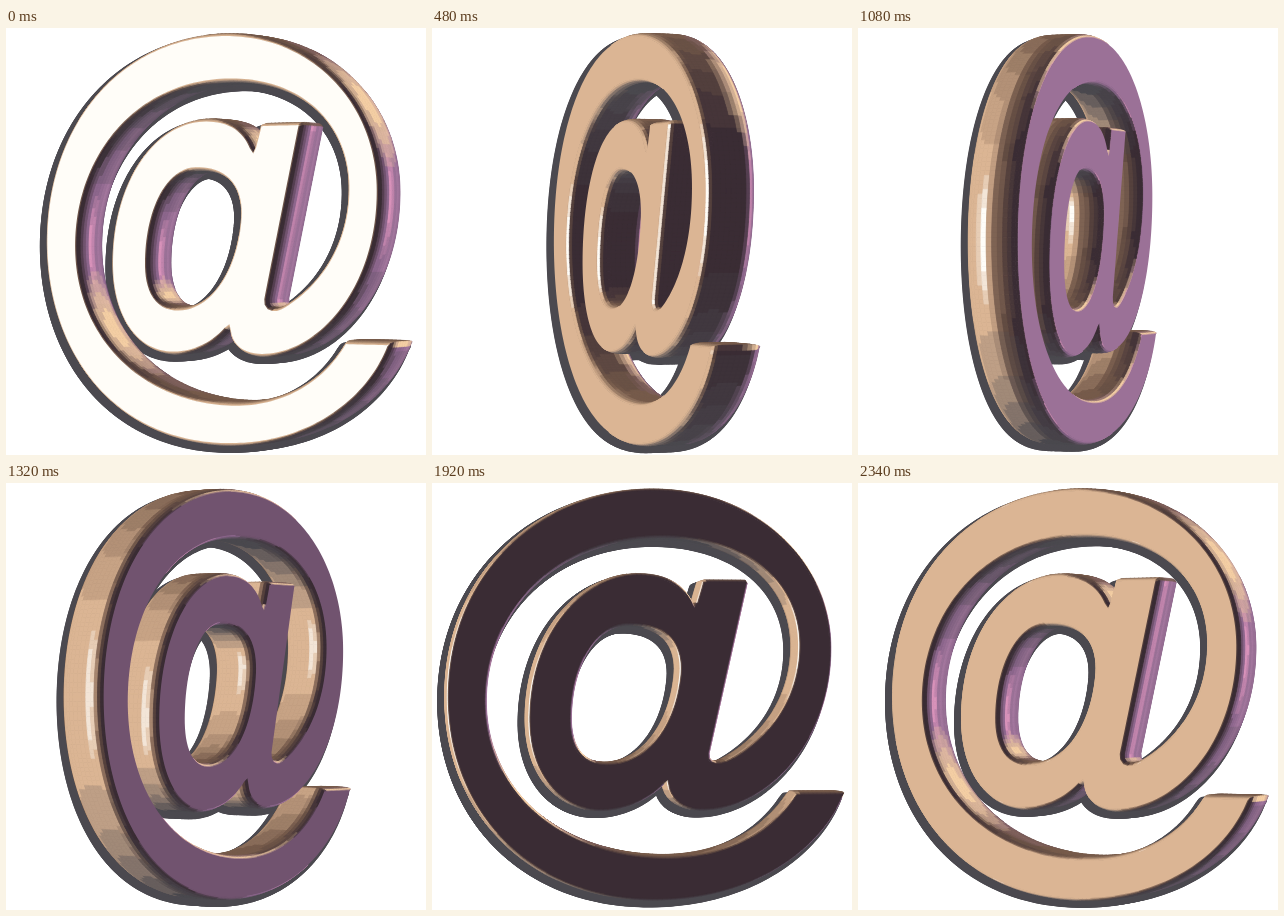
An HTML page with a canvas for the animation above (2400 ms loop, 420 px wide and 427 px high).

```html
<!DOCTYPE html>
<html lang="en">
<head>
<meta charset="utf-8">
<title>Turning at sign</title>
<style>
html, body { margin: 0; width: 100%; height: 100%; overflow: hidden; background: #fff; }
canvas { display: block; }
</style>
</head>
<body>
<canvas id="stage" width="420" height="427"></canvas>
<script>
const ctx = document.getElementById('stage').getContext('2d');
const STEP = 60, STEPS = 40, TURN = 180 / STEPS, START = 30;
const DEPTH = 25, LAYERS = 14, EYE = 2500, SPACING = 4.5;
const RAD = Math.PI / 180;

const BODY = `M414 311C392 368 322 417 224 417C92 417 14 325 14 214C14 92 104 6 222 6
  C325 6 401 76 401 165C401 262 334 327 270 327C248 327 234 316 234 298
  C216 318 190 327 168 327C124 327 95 290 95 236C95 152 146 91 206 91
  C236 91 254 103 262 124L270 97L316 97L277 270C275 280 285 283 296 277
  C338 254 367 214 367 162C367 96 310 53 230 53C124 53 53 128 53 218
  C53 312 134 375 236 375C290 375 338 352 364 311Z`;
const BOWL = `M196 141C232 141 251 160 246 196C240 246 210 281 174 281
  C150 281 138 264 138 236C138 184 162 141 196 141Z`;

// Evenly spaced outline points with outward normals.
function outline(d, reverse) {
  const path = document.createElementNS('http://www.w3.org/2000/svg', 'path');
  path.setAttribute('d', d);
  const len = path.getTotalLength(), n = Math.round(len / SPACING);
  const pts = Array.from({ length: n }, (_, i) => {
    const p = path.getPointAtLength(len * i / n);
    return { x: (p.x - 215) * 0.99, y: (p.y - 213) * 0.99 };
  });
  if (reverse) pts.reverse();
  pts.forEach((p, i) => {
    const a = pts[(i + n - 1) % n], b = pts[(i + 1) % n];
    const dx = b.x - a.x, dy = b.y - a.y, l = Math.hypot(dx, dy) || 1;
    p.nx = dy / l;
    p.ny = -dx / l;
  });
  return pts;
}
const rings = [outline(BODY), outline(BOWL, true)];

const DARK = [58, 44, 52], TAN = [219, 181, 148], WHITE = [255, 253, 248];
const UP = [118, 91, 75], DOWN = [75, 73, 79], PURPLE = [163, 118, 157];
const PINK = [216, 146, 186], WARM = [244, 206, 164];
// Reflected surroundings by heading; positive is to the left.
const SKY = [
  [-180, DARK], [-120, [90, 68, 92]], [-95, [133, 96, 134]], [-72, PURPLE],
  [-55, [140, 102, 140]], [-36, DARK], [0, DARK],
  [12, [98, 76, 66]], [20, [140, 110, 92]], [25, TAN], [92, TAN],
  [115, UP], [150, DARK], [180, DARK]
];
const mix = (a, b, t) => a.map((v, i) => v + (b[i] - v) * t);
const clamp = v => Math.max(0, Math.min(1, v));
const band = (v, n) => Math.round(v * n) / n;

function shade(x, y, z) {
  const yaw = Math.atan2(-x, z) / RAD;
  let i = 1;
  while (i < SKY.length - 1 && SKY[i][0] < yaw) i++;
  const [a, ca] = SKY[i - 1], [b, cb] = SKY[i];
  let c = mix(ca, cb, band((yaw - a) / (b - a), 3));
  const shine = (at, width, tall) =>
    band(clamp(1.6 - Math.abs(yaw - at) / width) * clamp(1 - y * y * tall), 3);
  c = mix(c, WHITE, shine(29.8, 2.5, 12));
  c = mix(c, PINK, shine(-59, 4, 8));
  c = mix(c, y < 0 ? UP : DOWN, band(Math.abs(y) ** 2.5, 5));
  // Warm light from the upper right
  const glow = clamp((0.72 * x - 0.58 * y + 0.38 * z - 0.88) / 0.12);
  return `rgb(${mix(c, WARM, band(glow, 4)).map(Math.round)})`;
}

function draw(deg) {
  const s = Math.sin(deg * RAD), c = Math.cos(deg * RAD);
  const axis = 214.5 + 5 * Math.sin(2 * deg * RAD);
  const level = k => Math.sin((k / LAYERS * 2 - 1) * Math.PI / 2);

  const project = (p, t) => {
    const out = 1 - 3.2 * t ** 6, z0 = DEPTH * t;
    const x = p.x + p.nx * out, y = p.y + p.ny * out;
    const z = x * s + z0 * c, k = EYE / (EYE - z);
    return { x: axis + (x * c - z0 * s) * k, y: 213 + y * k, z };
  };
  const layers = Array.from({ length: LAYERS + 1 }, (_, k) =>
    rings.map(ring => ring.map(p => project(p, level(k)))));

  const trace = pts => {
    pts.forEach((p, i) => i ? ctx.lineTo(p.x, p.y) : ctx.moveTo(p.x, p.y));
    ctx.closePath();
  };
  const slice = layer => {
    ctx.beginPath();
    layer.forEach(trace);
    ctx.fill('evenodd');
  };

  ctx.fillStyle = '#fff';
  ctx.fillRect(0, 0, 420, 427);

  // Grey edge behind the solid
  ctx.save();
  ctx.translate(-4.5, 4.5);
  ctx.fillStyle = ctx.strokeStyle = '#4b494f';
  ctx.lineWidth = 6;
  ctx.lineJoin = 'round';
  layers.forEach(layer => { slice(layer); ctx.stroke(); });
  ctx.restore();

  // Rounded walls, far to near
  const walls = [];
  for (let k = 0; k < LAYERS; k++) {
    const t = level(k + 0.5);
    const bend = (22 * t + 55 * t ** 9) * RAD;
    const side = Math.cos(bend), front = Math.sin(bend);
    rings.forEach((ring, r) => ring.forEach((p, i) => {
      const j = (i + 1) % ring.length, lo = layers[k][r], hi = layers[k + 1][r];
      const q = [lo[i], lo[j], hi[j], hi[i]];
      const area = (q[2].x - q[0].x) * (q[3].y - q[1].y) - (q[2].y - q[0].y) * (q[3].x - q[1].x);
      if (area <= 0) return;
      const nx = p.nx * side;
      walls.push({
        q, z: q[0].z + q[1].z + q[2].z + q[3].z,
        color: shade(nx * c - front * s, p.ny * side, nx * s + front * c)
      });
    }));
  }
  walls.sort((a, b) => a.z - b.z);
  ctx.lineWidth = 0.8;
  for (const w of walls) {
    ctx.fillStyle = ctx.strokeStyle = w.color;
    ctx.beginPath();
    trace(w.q);
    ctx.fill();
    ctx.stroke();
  }

  ctx.fillStyle = shade(-s, 0, c);
  slice(layers[LAYERS]);
}

let shown = -1;
function tick() {
  const step = Math.floor(performance.now() / STEP) % STEPS;
  if (step !== shown) {
    shown = step;
    const deg = START + step * TURN;
    draw((deg + 90) % 180 - 90);
  }
  requestAnimationFrame(tick);
}
tick();
</script>
</body>
</html>
```
